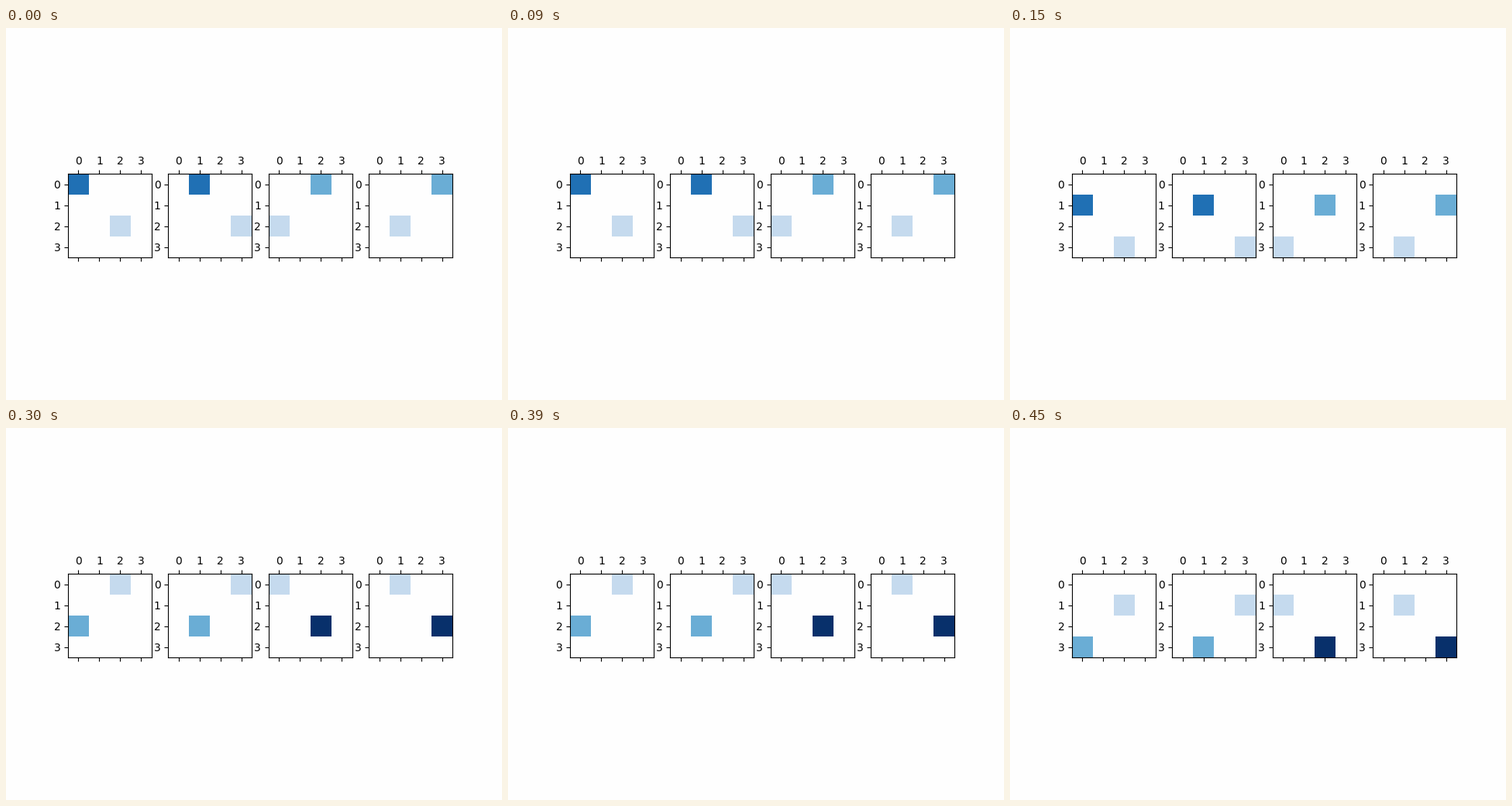
A matplotlib script that plays this animation: 640x480 px, repeating every 600 ms.

```python
import matplotlib.pyplot as plt
import numpy as np
from matplotlib.animation import FuncAnimation

SIZE = 4
INTERVAL = 150
PAPER = "#fefefe"


def panel_matrix(panel, step):
    """One strong and one weak cell, both moving down a row per step."""
    matrix = np.full((SIZE, SIZE), np.nan)
    left_half, early = panel < 2, step < 2
    if early:
        strong = 0.75 if left_half else 0.5
    else:
        strong = 0.5 if left_half else 1.0
    matrix[step, panel] = strong
    matrix[(step + 2) % SIZE, (panel + 2) % SIZE] = 0.25
    return np.ma.masked_invalid(matrix)


plt.rcParams["font.family"] = "DejaVu Sans"
fig, axes = plt.subplots(1, SIZE, figsize=(6.4, 4.8), dpi=100, facecolor=PAPER)

images = []
for panel, ax in enumerate(axes):
    ax.set_facecolor(PAPER)
    images.append(ax.matshow(panel_matrix(panel, 0), cmap="Blues",
                             vmin=0, vmax=1, interpolation="nearest"))
    ax.set_xticks(range(SIZE))
    ax.set_yticks(range(SIZE))


def update(frame):
    for panel, image in enumerate(images):
        image.set_data(panel_matrix(panel, frame % SIZE))
    return images


anim = FuncAnimation(fig, update, frames=SIZE, interval=INTERVAL,
                     repeat=True, repeat_delay=0, blit=False)
plt.show()
```
